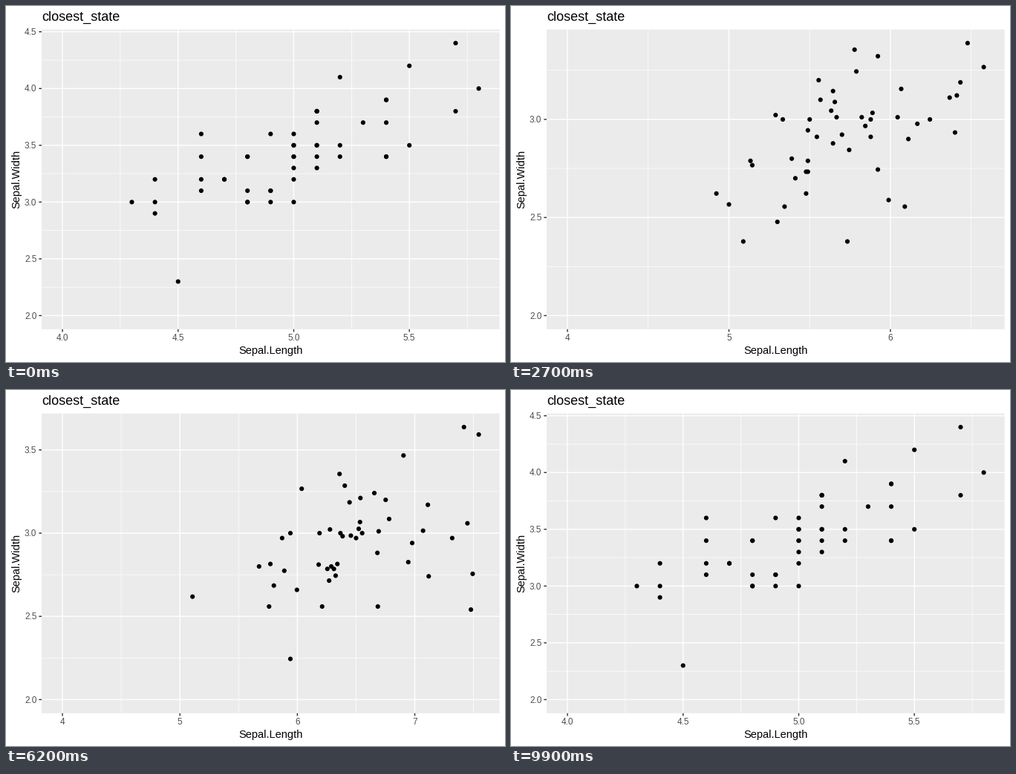
These frames come from a looping animation (672 by 480 pixels, 10000 ms). A matplotlib script:

```python
import math

import matplotlib.pyplot as plt
import numpy as np
from matplotlib.animation import FuncAnimation
from matplotlib.collections import LineCollection
from matplotlib.patches import Rectangle

W, H, DPI = 672, 480, 96
PX = 72 / DPI                                   # points per pixel
LEFT, TOP, RIGHT, BOTTOM = 48, 31.67, 664.67, 435.8
TICK, GAP = 3.67, 2.93
FRAMES = 100
LOW = np.array([4.0, 2.0])                      # fixed lower view limits

# Sepal length and width in tenths, one pair of lists per species
SETOSA = (
    [51, 49, 47, 46, 50, 54, 46, 50, 44, 49, 54, 48, 48, 43, 58, 57, 54,
     51, 57, 51, 54, 51, 46, 51, 48, 50, 50, 52, 52, 47, 48, 54, 52, 55,
     49, 50, 55, 49, 44, 51, 50, 45, 44, 50, 51, 48, 51, 46, 53, 50],
    [35, 30, 32, 31, 36, 39, 34, 34, 29, 31, 37, 34, 30, 30, 40, 44, 39,
     35, 38, 38, 34, 37, 36, 33, 34, 30, 34, 35, 34, 32, 31, 34, 41, 42,
     31, 32, 35, 36, 30, 34, 35, 23, 32, 35, 38, 30, 38, 32, 37, 33])
VERSICOLOR = (
    [70, 64, 69, 55, 65, 57, 63, 49, 66, 52, 50, 59, 60, 61, 56, 67, 56,
     58, 62, 56, 59, 61, 63, 61, 64, 66, 68, 67, 60, 57, 55, 55, 58, 60,
     54, 60, 67, 63, 56, 55, 55, 61, 58, 50, 56, 57, 57, 62, 51, 57],
    [32, 32, 31, 23, 28, 28, 33, 24, 29, 27, 20, 30, 22, 29, 29, 31, 30,
     27, 22, 25, 32, 28, 25, 28, 29, 30, 28, 30, 29, 26, 24, 24, 27, 27,
     30, 34, 31, 23, 30, 25, 26, 30, 26, 23, 27, 30, 29, 29, 25, 28])
VIRGINICA = (
    [63, 58, 71, 63, 65, 76, 49, 73, 67, 72, 65, 64, 68, 57, 58, 64, 65,
     77, 77, 60, 69, 56, 77, 63, 67, 72, 62, 61, 64, 72, 74, 79, 64, 63,
     61, 77, 63, 64, 60, 69, 67, 69, 58, 68, 67, 67, 63, 65, 62, 59],
    [33, 27, 30, 29, 30, 30, 25, 29, 25, 36, 32, 27, 30, 25, 28, 32, 30,
     38, 26, 22, 32, 28, 28, 27, 33, 32, 28, 30, 28, 30, 28, 38, 28, 28,
     26, 30, 34, 31, 30, 31, 31, 31, 27, 32, 33, 30, 25, 30, 34, 30])
STATES = [np.array(s).T / 10 for s in (SETOSA, VERSICOLOR, VIRGINICA)]
MOVES = [(6, 33), (40, 67), (74, 100)]          # start and end of each tween


def positions(frame):
    """Point coordinates; 101 steps are shown in 100 frames, one is skipped."""
    step = frame + (frame >= FRAMES // 2)
    pts = STATES[0]
    for i, (start, end) in enumerate(MOVES):
        if step > start:
            p = min(1, (step - start) / (end - start))
            pts = STATES[i] * (1 - p) + STATES[(i + 1) % 3] * p
    return pts


def nice_breaks(lo, hi, m=5):
    """Extended Wilkinson labelling: returns the breaks and their step."""
    best, found = -math.inf, None
    span = hi - lo
    for i, q in enumerate((1, 5, 2, 2.5, 4, 3)):
        for step in (q / 10, q):
            for k in range(2, 13):
                first = math.floor(hi / step) - (k - 1)
                for s in range(first, math.ceil(lo / step) + 1):
                    a, b = s * step, (s + k - 1) * step
                    cover = 1 - 0.5 * ((hi - b)**2 + (lo - a)**2) / (0.1 * span)**2
                    r = (k - 1) / (b - a)
                    rt = (m - 1) / (max(b, hi) - min(a, lo))
                    density = 2 - max(r / rt, rt / r)
                    score = -0.25 * i / 5 + 0.2 * cover + 0.5 * density
                    if score > best + 1e-9:
                        best, found = score, (s, k, step)
    s, k, step = found
    return (s + np.arange(k)) * step, step


def axis_breaks(low, high):
    pad = 0.05 * (high - low)
    lo, hi = low - pad, high + pad
    major, step = nice_breaks(lo, hi)
    minor = np.append(major - step / 2, major[-1] + step / 2)
    minor = minor[(minor > lo) & (minor < hi)]
    major = major[(major > lo) & (major < hi)]
    digits = next(d for d in range(4) if abs(round(step, d) - step) < 1e-9)
    return major, minor, [f"{v:.{digits}f}" for v in major]


plt.rcParams["font.family"] = "Liberation Sans"
fig = plt.figure(figsize=(W / DPI, H / DPI), dpi=DPI, facecolor="white")
ax = fig.add_axes([0, 0, 1, 1])
ax.set(xlim=(0, W), ylim=(H, 0))
ax.axis("off")


def lines(color, width, z):
    coll = LineCollection([], colors=color, linewidths=width * PX, zorder=z,
                          capstyle="butt")
    coll.set_snap(False)
    return ax.add_collection(coll, autolim=False)


def label(x, y, text, size, color="black", **kw):
    return ax.text(x, y, text, fontsize=size, color=color, va="baseline", **kw)


panel = Rectangle((LEFT, TOP), RIGHT - LEFT, BOTTOM - TOP, fc="#EBEBEB", lw=0,
                  zorder=0)
panel.set_snap(False)
ax.add_patch(panel)
minor_grid = lines("white", 0.71, 1)
major_grid = lines("white", 1.42, 2)
ticks = lines("#333333", 1.42, 4)
# One size per point keeps sub-pixel placement
dots = ax.scatter(*STATES[0].T, s=np.full(50, (6.16 * PX)**2), c="black",
                  linewidths=0, zorder=3)

label(LEFT, 20.3, "closest_state", 13.5)
label((LEFT + RIGHT) / 2, 468.7, "Sepal.Length", 11, ha="center")
label(18.3, (TOP + BOTTOM) / 2, "Sepal.Width", 11, ha="center", rotation=90,
      rotation_mode="anchor")
x_labels = [label(0, 451, "", 8.8, "#4D4D4D", ha="center") for _ in range(12)]
y_labels = [label(LEFT - TICK - GAP, 0, "", 8.8, "#4D4D4D", ha="right")
            for _ in range(12)]


def vertical(xs, y0=TOP, y1=BOTTOM):
    return [[(x, y0), (x, y1)] for x in xs]


def horizontal(ys, x0=LEFT, x1=RIGHT):
    return [[(x0, y), (x1, y)] for y in ys]


def draw(frame):
    pts = positions(frame)
    high = pts.max(axis=0)

    def to_x(v):
        return LEFT + (RIGHT - LEFT) * ((v - LOW[0]) / (high[0] - LOW[0]) + 0.05) / 1.1

    def to_y(v):
        return BOTTOM - (BOTTOM - TOP) * ((v - LOW[1]) / (high[1] - LOW[1]) + 0.05) / 1.1

    x_major, x_minor, x_text = axis_breaks(LOW[0], high[0])
    y_major, y_minor, y_text = axis_breaks(LOW[1], high[1])
    xs, ys = to_x(x_major), to_y(y_major)

    minor_grid.set_segments(vertical(to_x(x_minor)) + horizontal(to_y(y_minor)))
    major_grid.set_segments(vertical(xs) + horizontal(ys))
    ticks.set_segments(vertical(xs, BOTTOM, BOTTOM + TICK)
                       + horizontal(ys, LEFT - TICK, LEFT))
    dots.set_offsets(np.column_stack([to_x(pts[:, 0]), to_y(pts[:, 1])]))

    for t in x_labels + y_labels:
        t.set_text("")
    for t, x, s in zip(x_labels, xs, x_text):
        t.set_x(x)
        t.set_text(s)
    for t, y, s in zip(y_labels, ys, y_text):
        t.set_y(y + 4.2)
        t.set_text(s)
    return []


anim = FuncAnimation(fig, draw, frames=FRAMES, interval=100, repeat=True,
                     repeat_delay=0, blit=False)
plt.show()
```
